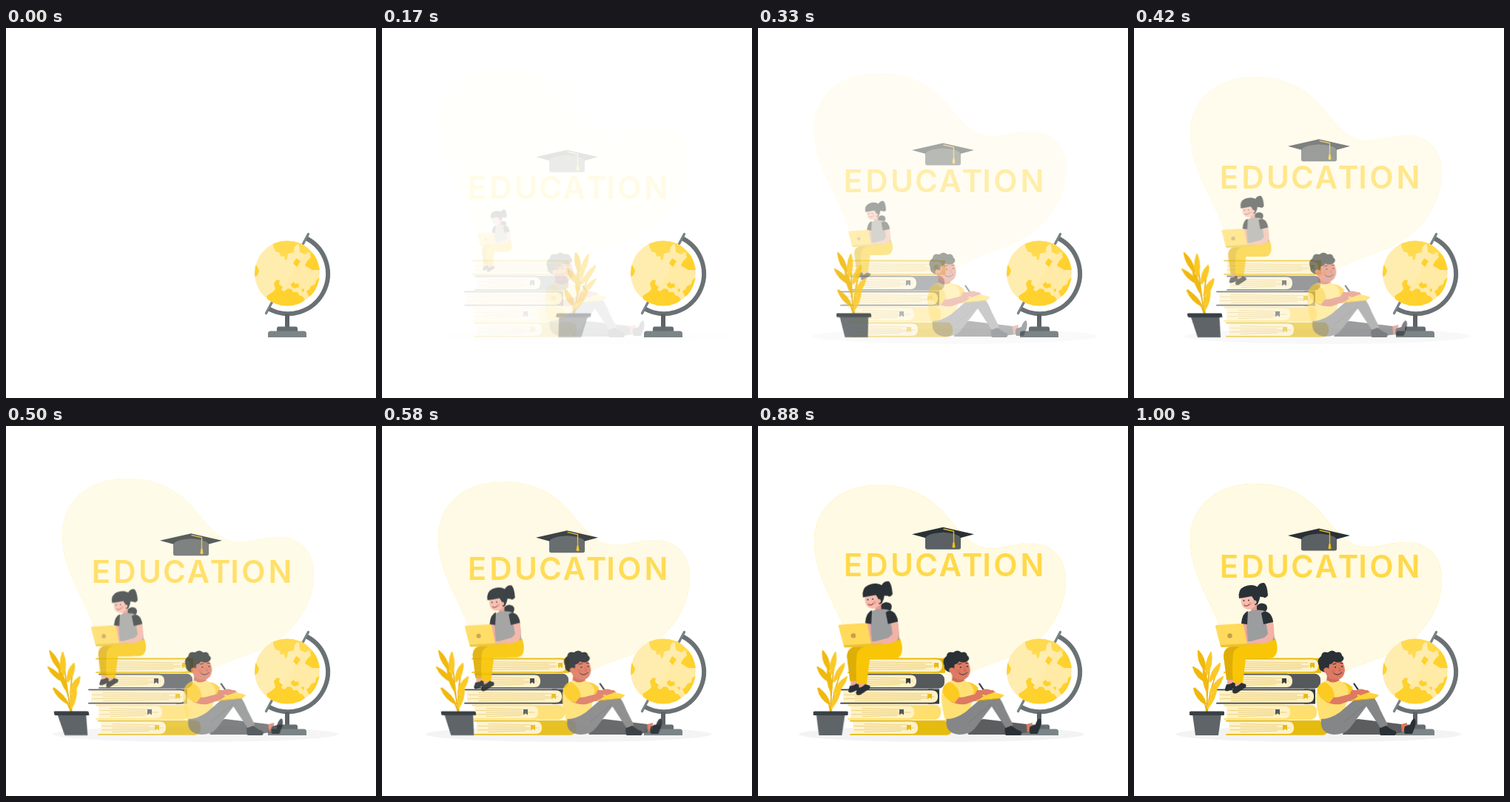
Recreate the animation shown at these times as an HTML page. Size 500 px wide and 500 px high, loop 1040 ms.

```html
<!DOCTYPE html>
<html lang="en">
<head>
<meta charset="utf-8">
<title>Education</title>
<style>
  html, body { margin: 0; width: 100%; height: 100%; overflow: hidden; background: #fff; }
  svg { display: block; width: 100vw; height: 100vh; }
  #girl { transform-origin: 153px 288px; }
  #plant { transform-origin: 98px 360px; }
  #title text { font: 600 42px Inter, "Open Sans", sans-serif; text-anchor: middle; fill: #ffd94a; }
  .ink { fill: #2a3136; }
  .line { fill: none; stroke-linecap: round; stroke-linejoin: round; }
</style>
</head>
<body>
<svg viewBox="0 0 500 500">
  <defs>
    <path id="cloud" d="M76 155C76 108 112 78 163 78C212 78 238 98 262 128C284 156 300 167 326 163C346 159 356 157 370 157C400 158 416 178 416 207C416 242 396 281 354 304C326 318 292 324 260 346H128C126 320 127 300 120 280C106 240 76 200 76 155Z"/>
    <clipPath id="ball"><circle cx="380" cy="331.5" r="44"/></clipPath>
  </defs>

  <g id="blob">
    <use href="#cloud" fill="#ffd93b"/>
    <use href="#cloud" fill="#fff" opacity=".86"/>
  </g>
  <ellipse id="shadow" cx="249.5" cy="416.5" rx="193" ry="10.5" fill="#f3f3f3"/>

  <g id="title">
    <path d="M226 151Q228 146 250 145Q272 146 274 151V166Q274 168.500 271 168.500H229Q226 168.500 226 166Z" fill="#5a6063"/>
    <path class="ink" d="M208 148L250 138.500 292 148 273.500 153Q272 147 250 145.500Q228 147 226.500 153Z"/>
    <path class="line" d="M251 141L264.500 144V162" stroke="#e6b91a" stroke-width="1.400"/>
    <path d="M263.500 159h2l1 6q-2 3-4 0z" fill="#f2c21a"/>
    <text y="205" x="128.500 160.500 194.500 227.500 259.700 289.500 309 334.500 370.500">EDUCATION</text>
  </g>

  <g id="books"></g>

  <g id="globe">
    <path class="line" d="M408.500 278.500L351.500 385.500" stroke="#7b8486" stroke-width="3.400"/>
    <path d="M406.500 284.500A54 54 0 1 1 355.500 379.700" fill="none" stroke="#6a7174" stroke-width="6"/>
    <path d="M377 386h6v19h-6z" fill="#5d6365"/>
    <path d="M366 410v-4q0-2.500 2.500-2.500h23q2.500 0 2.500 2.500v4z" fill="#666d70"/>
    <path d="M354 418v-5q0-3.500 3.500-3.500h45q3.500 0 3.500 3.500v5z" fill="#7b8486"/>
    <g clip-path="url(#ball)">
      <circle cx="380" cy="331.500" r="44" fill="#ffeaa6"/>
      <path d="M336 287H413L358 376H336Z" fill="#ffedb0"/>
      <path fill="#ffda4e" d="M360 286L361 294 364 302 370 304 371 309 376 308 377 314 380 312 381 305 389 303 390 296 394 292 396 293 397 303 404 306 410 303 412 309 407 315 404 321 410 323 414 327 426 327V300L400 284Z"/>
      <path fill="#ffd12c" d="M392 311L398 315 393 323 388 318ZM411 306L426 300V327L414 327 404 321 407 315 413 311ZM334 318L338 320 342 328 340 334 335 337ZM362 345L366 340 370 341 369 346 374 350 372 354 376 356 381 352 386 353 388 357 394 357 397 362 400 362 404 367 392 380H358L352 362 360 357 364 353ZM385 346L389 343 391 346 395 345 396 350 390 352 386 350ZM399 353L403 352 402 358ZM424 337L419 341 418 346 412 349 410 353 406 356 409 362 416 364 428 350Z"/>
    </g>
  </g>

  <g id="boy">
    <path d="M282 417Q286 398 303 396L362 403 365 414 340 417Z" fill="#5b5d5f"/>
    <path d="M361 403L369 401 368 411 362 414Z" fill="#dd7a63"/>
    <path class="ink" d="M366 406L373 404Q375 397 379 395Q382 398 380 406L376 416H366Q364 411 366 406Z"/>
    <path d="M334 403L341 401 343 407 335 410Z" fill="#c9604f"/>
    <path class="ink" d="M332 408Q336 404 341 405Q348 411 353 412Q356 415 353 418H333Q331 413 332 408Z"/>
    <path d="M284 352Q292 354 297 357L316 357 319 360 300 364 286 362Z" fill="#dd7a63"/>
    <path d="M280 346Q289 346 296 354L291 363 281 360Z" fill="#fccb22"/>
    <path d="M261 336H276L278 347Q268 352 260 347Z" fill="#cf6b56"/>
    <path d="M262 344Q268 349 277 344Q287 347 290 357L288 372 280 400H252Q243 370 248 354Q253 345 262 344Z" fill="#ffe173"/>
    <path d="M253 396Q265 396 278 387L300 368Q311 361 322 364Q328 371 333 384L343 404 333 408 314 379 291 409Q284 417 270 417Q250 415 253 396Z" fill="#858687"/>
    <path class="line" d="M284 400L313 376" stroke="#747678" stroke-width=".8"/>
    <path d="M291 371L309 358 330 363 324 368Z" fill="#ffd436"/>
    <path class="line" d="M291 371.500L324 368.500 330 364" stroke="#dba90e" stroke-width="1"/>
    <path class="line" d="M297.500 348.500L304 358" stroke="#2a3136" stroke-width="2.200"/>
    <path d="M300 357Q309 353 317 360L306 364 299 361Z" fill="#dd7a63"/>
    <path d="M259 364Q272 369 281 365L297 361 303 365 298 369 279 376Q266 377 258 372Z" fill="#dd7a63"/>
    <path d="M258 346Q247 348 248 360Q252 371 264 374L271 365Q270 352 258 346Z" fill="#fccb22"/>
    <path d="M258 320Q263 311 278 315Q284 319 285 330Q284 342 274 343Q262 343 259 334Z" fill="#dd7a63"/>
    <path class="ink" d="M258 333Q249 331 250 324Q246 316 253 311Q254 304 262 306Q268 301 273 306Q280 304 281 310Q286 314 281 318Q276 321 270 318Q268 322 264 322L263 329Z"/>
    <circle cx="260" cy="330" r="3.600" fill="#dd7a63"/>
    <circle class="ink" cx="272" cy="326" r="1"/><circle class="ink" cx="281" cy="325" r="1"/>
    <path class="line" d="M269 322l4-1m6-.5l3 0M270 334Q275 339 281 333" stroke="#2a3136" stroke-width="1"/>
    <path class="line" d="M277 327l2 3.500-2 .5" stroke="#b9533f" stroke-width=".8"/>
    <circle cx="269" cy="331" r="2.500" fill="#e8604c" opacity=".5"/>
  </g>

  <g id="girl">
    <path d="M126 340H135L134 350 126 351Z" fill="#efa99c"/>
    <path class="ink" d="M125 349Q130 350 134 346L139 349Q135 356 127 358Q122 359 123 355Z"/>
    <path d="M168 291L134 297Q121 299 121 311L125 343H137L139 314 172 314Z" fill="#dfae06"/>
    <path d="M136 342H145V350L137 352Z" fill="#efa99c"/>
    <path class="ink" d="M135 352Q141 352 145 347L151 349Q153 353 148 355L139 361Q133 363 133 358Z"/>
    <path d="M155 294L191 287Q197 305 189 312Q186 314 180 314H151L147 347H134Q132 328 134 308Q136 298 155 294Z" fill="#f8c606"/>
    <path d="M147 265L153 263 154 281 159 291 152 293Q146 283 147 265Z" fill="#efa99c"/>
    <path d="M157 241L166 238 168 251 159 254Z" fill="#e89b8f"/>
    <path class="ink" d="M166 243Q171 237 178 241Q182 245 178 251L166 252Z"/>
    <path d="M153 252Q160 247 173 249Q186 252 188 266L190 289Q173 293 154 291Q151 270 153 252Z" fill="#9c9d9e"/>
    <path class="ink" d="M154 250Q146 253 145 267L153 268Z"/>
    <path d="M178 263L187 262Q191 278 188 288Q184 293 174 294L153 297 151 293 176 286 181 281Z" fill="#f2b2a5"/>
    <path class="ink" d="M172 253Q178 248 184 254Q188 260 188 265L175 268Z"/>
    <path class="ink" d="M165 221Q168 211 176 212Q180 215 181 229Q178 234 174 231Q169 232 167 225Z"/>
    <path d="M144 229Q151 221 164 227L167 238Q163 247 155 248Q146 247 145 239Z" fill="#f5bdaf"/>
    <path class="ink" d="M142 233Q140 221 149 217Q161 212 169 219Q173 229 167 241L163 242Q164 236 159 230Q149 232 142 233Z"/>
    <circle cx="163" cy="238" r="2.600" fill="#f2b2a5"/>
    <circle class="ink" cx="148.500" cy="236" r=".9"/><circle class="ink" cx="155" cy="235.500" r=".9"/>
    <path class="line" d="M149 242Q152 245 156 241" stroke="#a6443c" stroke-width="1.100"/>
    <circle cx="157.500" cy="240" r="2.200" fill="#ee8678" opacity=".5"/>
    <path d="M111 269L145 267Q147 267 148 269L153 295 117 298 110 271Q110 269 111 269Z" fill="#ffda5b"/>
    <path d="M117 296L168 293Q170 295 167 297L119 299Q117 299 117 296Z" fill="#efc12c"/>
    <circle cx="129.500" cy="283.500" r="3.200" fill="#c3a04c"/>
  </g>

  <g id="plant">
    <g id="leaves"></g>
    <path d="M79 389H118L114 418H83Z" fill="#5e6467"/>
    <rect x="75" y="385.500" width="47" height="5.500" rx="1.500" fill="#394045"/>
  </g>
</svg>
<script>
const $ = id => document.getElementById(id);
const gold = '#e6bb10', dark = '#55595c', black = '#363c40';

// left, top, end of pages, end of spine, cover, bookmark x, bookmark colour
const book = (x, y, end, spine, cover, mark, tint) => {
  let rules = '';
  for (let i = 1; i < 6; i++) rules += `M${x + 5 + i % 2 * 14} ${y + 2.5 + i * 2.7}L${end - 6 - i % 3 * 9} ${y + 4.5 + i * 2}`;
  const edge = `M${x} ${y + 1}H${end - 9}q9 0 9 9.2t-9 9.2H${x}`;
  return `<rect x="${end - 14}" y="${y + .2}" width="${spine - end + 14}" height="20" rx="${Math.min(8, (spine - end) / 4)}" fill="${cover}"/>
    <path d="M${x + 3} ${y + 1}H${end - 9}q9 0 9 9.2t-9 9.2H${x + 3}z" fill="#fff2c8"/>
    <path class="line" d="${rules}" stroke="#e3c05a" stroke-width=".7"/>
    <path class="line" d="${edge}" stroke="${cover}" stroke-width="1.800"/>
    <path d="M${mark} ${y + 6.500}h6v7.500l-3-2.300-3 2.300z" fill="${tint}"/>`;
};
$('books').innerHTML =
  book(125, 397.5, 217, 263, gold, 201, gold) +
  book(122, 376.5, 212, 247, '#ffdf6e', 191, dark) +
  book(112, 355.3, 244, 245, black, 229, gold) +
  book(126, 334.5, 215, 252, dark, 200, black) +
  book(122, 313.5, 250, 253, gold, 238, gold);

const leaf = ([x, y, bx, by, w], i) => {
  const mx = (x + bx) / 2, my = (y + by) / 2, len = Math.hypot(bx - x, by - y);
  const nx = (by - y) / len * w, ny = (x - bx) / len * w;
  return `<path d="M${bx} ${by}Q${mx + nx} ${my + ny} ${x} ${y}Q${mx - nx} ${my - ny} ${bx} ${by}" fill="${i % 2 ? '#fbc926' : '#f0b90e'}"
    stroke="${i % 2 ? '#fbc926' : '#f0b90e'}" stroke-linejoin="round" stroke-width="2"/>`;
};
$('leaves').innerHTML =
  '<path class="line" d="M98 387Q102 352 88 308M98 387Q99 350 104 309M99 387Q102 352 116 324M98 387Q96 366 82 354" stroke="#e5ae0c" stroke-width="1.600"/>' +
  [[87, 304, 96, 330, 6], [104, 306, 98, 337, 6], [80, 326, 97, 346, 6], [116, 321, 102, 346, 6],
   [94, 329, 99, 360, 5], [120, 339, 102, 362, 6], [81, 355, 97, 376, 6], [112, 353, 99, 382, 5]].map(leaf).join('');

const easing = 'cubic-bezier(.36,-.01,.5,1.38)';
const enter = (id, ...steps) => {
  const anim = $(id).animate(steps.map(s => ({ easing, ...s })), { duration: 1000, fill: 'both' });
  anim.pause();
  return anim;
};
const arrive = (id, from) => enter(id, { opacity: 0, transform: from }, { opacity: 1, transform: 'none' });

const anims = [
  arrive('blob', 'translate(0px, -30px)'),
  arrive('shadow', 'translate(30px, 0px)'),
  arrive('title', 'translate(0px, 30px)'),
  arrive('books', 'none'),
  arrive('boy', 'translate(-30px, 0px)'),
  arrive('girl', 'scale(.5)'),
  enter('plant',
    { opacity: 0, transform: 'translate(250px) skewX(-20deg)' },
    { opacity: 1, transform: 'translate(0px) skewX(10deg)', offset: .6 },
    { opacity: 1, transform: 'translate(0px) skewX(-2deg)', offset: .8 },
    { opacity: 1, transform: 'translate(0px) skewX(0deg)' })
];

// The motion advances in steps of 1/24 s; the first two stay empty.
const start = performance.now();
const draw = () => {
  const step = Math.floor(((performance.now() - start) % 1040 + 5) / 41.6);
  const time = step < 2 ? 0 : Math.min(1000, step * 41.67 + 18);
  for (const a of anims) a.currentTime = time;
  requestAnimationFrame(draw);
};
draw();
</script>
</body>
</html>
```
